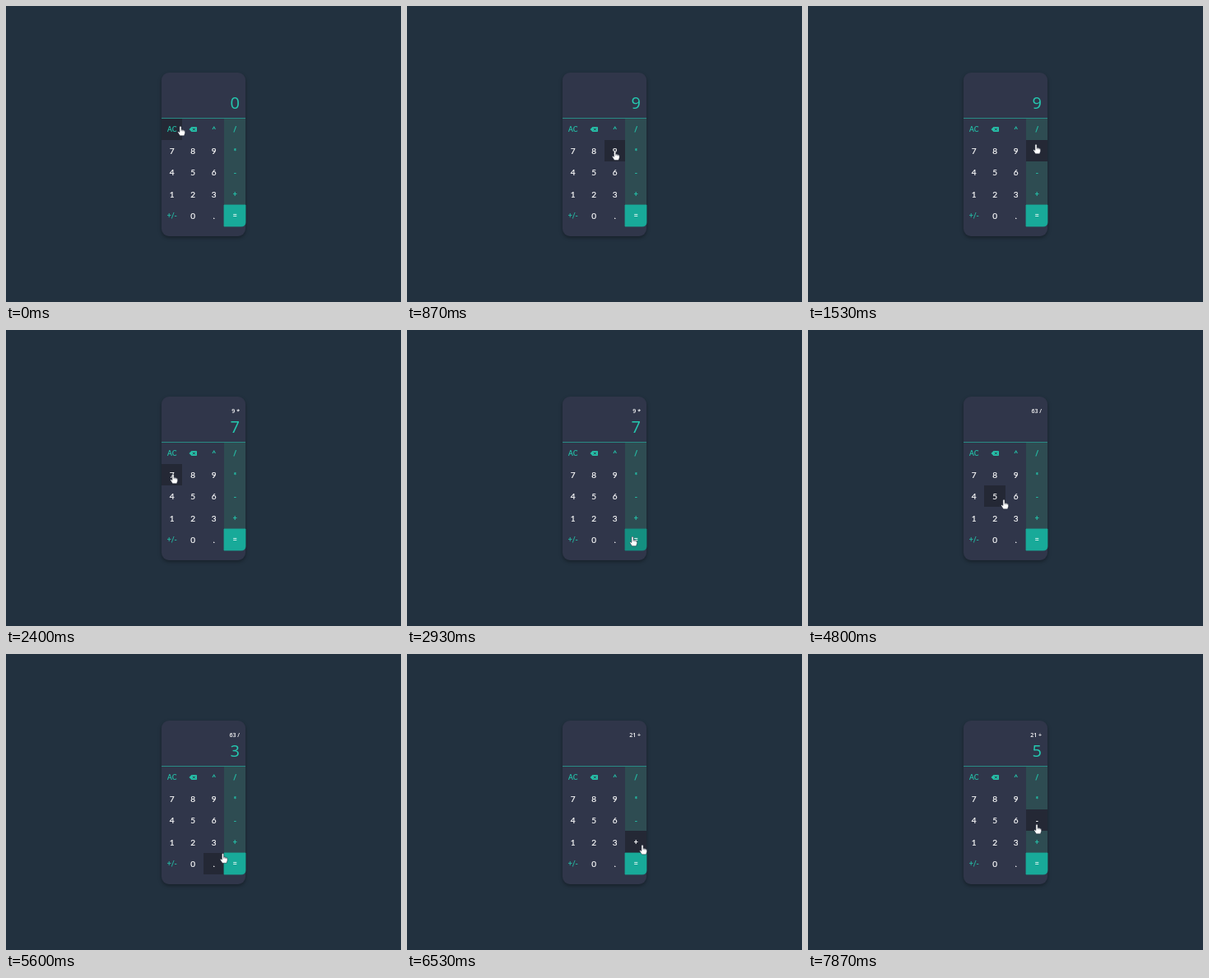
An HTML page that plays this animation: 480 px wide and 360 px high, repeating every 8 s.

```html
<!DOCTYPE html>
<html lang="en">
<head>
<meta charset="utf-8">
<title>Calculator</title>
<style>
  html, body { margin: 0; height: 100%; overflow: hidden; background: #22313f; }
  svg { display: block; width: 480px; height: 360px; font-family: Lato, sans-serif; }
  .card { fill: #30364a; filter: drop-shadow(0 2px 2px #0005); }
  .key { --ink: #fff; --face: transparent; }
  .key path { fill: var(--face); }
  .key text { fill: var(--ink); stroke: var(--ink); stroke-width: .2; font-size: 10px; text-anchor: middle; }
  .key.fn { --ink: #25c0a8; }
  .key.fn text { font-size: 8.5px; }
  .key.op { --face: #2e4c52; }
  .key.op text, .key.bold text { font-weight: 700; }
  .key.hover { --face: #242835; }
  .key.op.hover { --ink: #fff; }
  .key.eq { --face: #18aa99; --ink: #d5f3ee; }
  .key.eq path { stroke: var(--face); stroke-width: .8; }
  .key.eq.hover { --face: #148f80; }
  .display { text-anchor: end; font-family: "Open Sans", "Noto Sans", sans-serif; }
</style>
</head>
<body>
<svg viewBox="0 0 480 360">
  <rect class="card" x="189" y="81" width="102" height="199" rx="9"/>
  <g id="keys"></g>
  <path d="M189 136.5h102" stroke="#298a84"/>
  <path d="M222.5 150l3-3h5.7q.8 0 .8.8v4.4q0 .8-.8.8h-5.7z" fill="#25c0a8"/>
  <path d="M227 148.6l2.8 2.8m0-2.8l-2.8 2.8" stroke="#30364a"/>
  <g class="display">
    <text id="past" x="284" y="101" font-size="7" font-weight="600" fill="#fff"></text>
    <text id="now" x="284" y="125" font-size="20" fill="#25c9b0"></text>
  </g>
  <path id="hand" fill="#fff" stroke="#1b2030" stroke-width=".5" stroke-linejoin="round"
    d="M-1.1 1Q0-.8 1.1 1V4.2L2.8 4.5L4.3 5L5.6 6V8.6L4.5 11.8H-.6L-3.3 7.4Q-2.8 5.9-1.1 7.6ZM1.1 4.2v2M2.8 4.5v1.9M4.3 5v1.6"/>
</svg>
<script>
// All times below are in steps of 1/15 s
const FPS = 15, LOOP = 120;
const LEFT = 189, TOP = 137, KEY_W = 25.5, KEY_H = 26.3;
const labels = 'AC,,^,/,7,8,9,*,4,5,6,-,1,2,3,+,+/-,0,.,='.split(',');
const $ = id => document.getElementById(id);

const home = { x: 212, y: 146 };
const moves = [
  { from: 1, to: 6, x: 252, y: 176, key: '9', press: 10 },
  { from: 12, to: 23, x: 277, y: 168, key: '*', press: 27 },
  { from: 29, to: 35, x: 203, y: 175, key: '7', press: 36 },
  { from: 36, to: 44, x: 274, y: 251, key: '=', press: 47 },
  { from: 49, to: 56, x: 285, y: 143, key: '/', press: 58 },
  { from: 61, to: 72, x: 238, y: 206 },
  { from: 72, to: 74, x: 250, y: 228, key: '3', press: 78 },
  { from: 80, to: 88, x: 277, y: 257 },
  { from: 90, to: 95, x: 286, y: 232, key: '+', press: 98 },
  { from: 104, to: 111, x: 228, y: 204, key: '5', press: 112 },
  { from: 112, to: 118, x: 278, y: 207 }
];

function makeKey(label, i) {
  const col = i % 4, row = i / 4 | 0;
  const x = LEFT + col * KEY_W, y = TOP + row * KEY_H;
  // Whole-pixel edges leave no seams between neighbours
  const [l, t, r, b] = [x, y, x + KEY_W, y + KEY_H].map(Math.floor);
  const op = col === 3, fn = op || row === 0 || label === '+/-';
  const kind = ['key', fn && 'fn', op && 'op', label === '^' && 'bold', label === '=' && 'eq']
    .filter(Boolean).join(' ');
  const round = label === '=' ? 5 : 0;
  return `<g class="${kind}">
    <path d="M${l} ${t}H${r}V${b - round}q0 ${round} ${-round} ${round}H${l}z"/>
    <text x="${x + KEY_W / 2}" y="${y + KEY_H / 2 + (fn ? 3.1 : 3.7)}">${label}</text></g>`;
}
$('keys').innerHTML = labels.map(makeKey).join('');
const keys = [...$('keys').children];

function tipAt(step) {
  let { x, y } = home;
  for (const m of moves) {
    const u = Math.min(1, Math.max(0, (step - m.from) / (m.to - m.from)));
    const e = u * u * (3 - 2 * u);
    x += (m.x - x) * e;
    y += (m.y - y) * e;
  }
  return [x, y];
}

const solve = {
  '+': (a, b) => a + b, '-': (a, b) => a - b,
  '*': (a, b) => a * b, '/': (a, b) => a / b
};

function readout(step) {
  let left = 0, op = '', now = '0', past = '';
  for (const { key, press } of moves) {
    if (!key || press > step) continue;
    if (key >= '0' && key <= '9') { now = key; continue; }
    if (op) now = solve[op](left, +now);
    if (key === '=') {
      op = past = '';
    } else {
      left = +now;
      op = key;
      past = `${now} ${key}`;
      now = '';
    }
  }
  return [past, now];
}

function draw(ms) {
  const step = Math.floor((ms + 5) * FPS / 1000) % LOOP;
  const [x, y] = tipAt(step);
  const over = Math.floor((y - TOP) / KEY_H) * 4 + Math.floor((x - LEFT) / KEY_W);
  keys.forEach((key, i) => key.classList.toggle('hover', i === over));
  $('hand').setAttribute('transform', `translate(${x} ${y})`);
  [$('past').textContent, $('now').textContent] = readout(step);
}

const start = performance.now();
function tick() {
  draw(performance.now() - start);
  requestAnimationFrame(tick);
}
tick();
</script>
</body>
</html>
```
